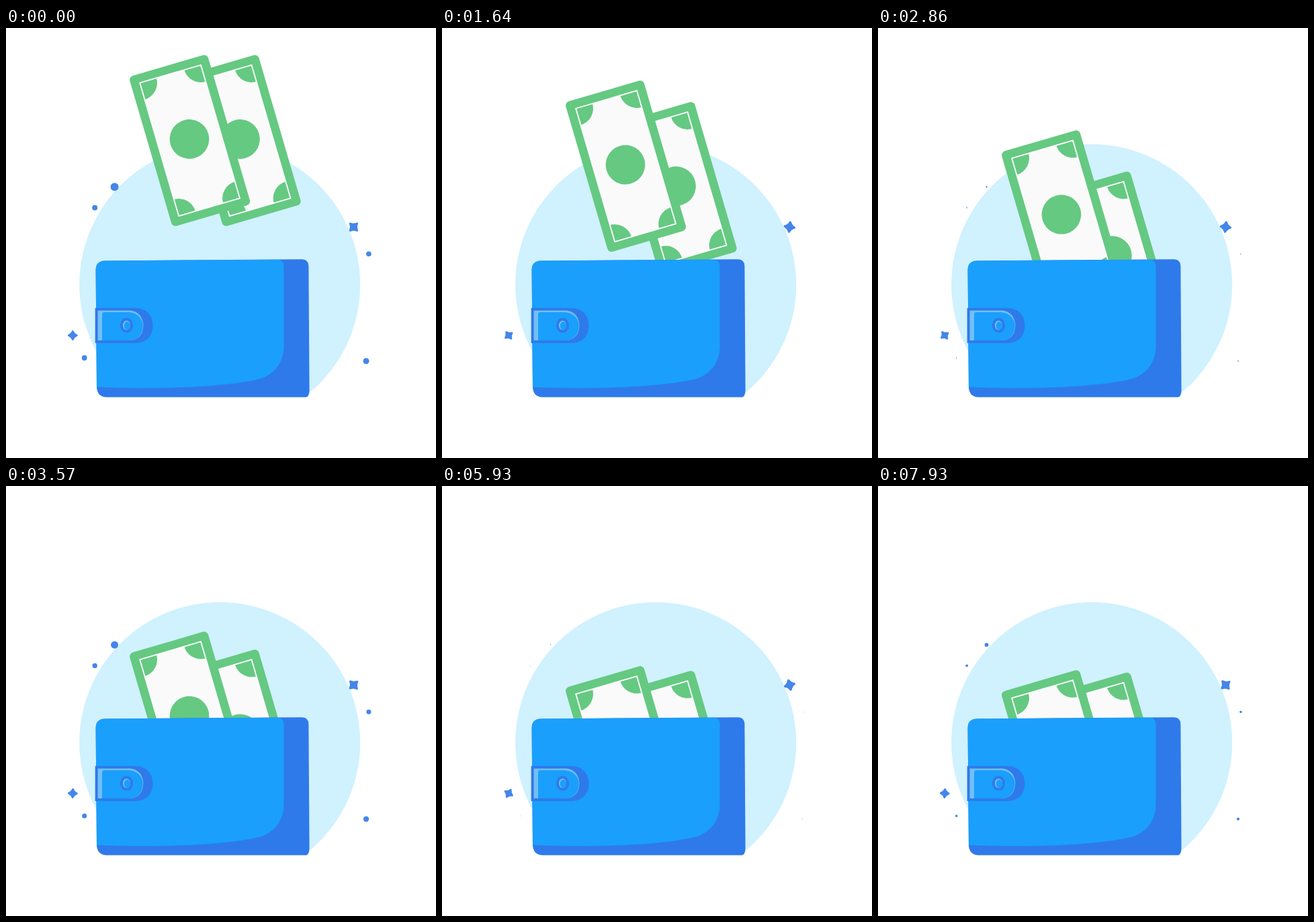
Write an HTML page that moves like this. It is 640 px wide and 640 px high and loops after 8 s.

```html
<!DOCTYPE html>
<html lang="en">
<head>
<meta charset="utf-8">
<title>Wallet</title>
<style>
  html, body { margin: 0; width: 100%; height: 100%; overflow: hidden; background: #fff; }
  svg { display: block; width: 100%; height: 100%; }
</style>
</head>
<body>
<svg viewBox="0 0 640 640">
  <defs>
    <clipPath id="ground"><rect width="640" height="546"/></clipPath>
    <clipPath id="inner"><rect x="-47.3" y="-103.3" width="94.6" height="206.6"/></clipPath>
    <g id="bill" transform="rotate(-16.3)">
      <rect x="-60.8" y="-116.5" width="121.6" height="233" rx="6.5" fill="#65c982"/>
      <rect x="-47.3" y="-103.3" width="94.6" height="206.6" fill="#fafafa"/>
      <g fill="#65c982" clip-path="url(#inner)">
        <circle cx="-47.3" cy="-103.3" r="25.8"/>
        <circle cx="47.3" cy="-103.3" r="25.8"/>
        <circle cx="-47.3" cy="103.3" r="25.8"/>
        <circle cx="47.3" cy="103.3" r="25.8"/>
      </g>
      <circle cx="0" cy="-2.2" r="29.3" fill="#65c982"/>
      <rect x="-47.3" y="-103.3" width="94.6" height="206.6" fill="none" stroke="#fff" stroke-width="1.8"/>
    </g>
    <path id="star" d="M0-7.1Q2-2 7.1 0Q2 2 0 7.1Q-2 2-7.1 0Q-2-2 0-7.1Z"
      fill="#4486ea" stroke="#4486ea" stroke-width="3.3" stroke-linejoin="round"/>
  </defs>

  <circle cx="318.2" cy="382" r="209" fill="#d0f1fe" clip-path="url(#ground)"/>
  <g fill="#4486ea">
    <circle class="dot" cx="161.6" cy="236.4" r="6"/>
    <circle class="dot" cx="132.2" cy="267.4" r="4"/>
    <circle class="dot" cx="539.9" cy="336.3" r="3.8"/>
    <circle class="dot" cx="536" cy="495.7" r="4.5"/>
    <circle class="dot" cx="116.7" cy="491" r="3.9"/>
  </g>
  <use id="bigStar" href="#star"/>
  <use id="smallStar" href="#star"/>
  <use id="back" href="#bill"/>
  <use id="front" href="#bill"/>

  <g id="wallet">
    <path fill="#2f7aea" d="M133.6 360Q133.6 347 147 346.4L440 344.2Q450 344.2 450.4 354L451.6 540Q451 549.6 446 549.6H150Q136 549 135 535Z"/>
    <path fill="#1a9ffc" d="M133.6 360Q133.6 347 147 346.4L405 344.7Q413.3 345.5 413.5 355V474C413.5 501 395 519.5 372 523.5C320 535 220 538 135 534.5Z"/>
    <path fill="#2f7aea" d="M132.7 416.7H192C209 416.7 218.5 428 218.5 443S209 469 192 469H132.7Z"/>
    <path fill="#73bff6" d="M136.6 420.5H183C197 420.5 204.3 431 204.3 443S197 465 183 465H136.6Z"/>
    <path fill="#1a9ffc" d="M143 426Q143 423 146 423H181C195 423 203.6 432 203.6 443.5S196 465 183 465H143Z"/>
    <ellipse cx="179.5" cy="442.5" rx="9.6" ry="11" fill="#2f7aea"/>
    <ellipse cx="179.5" cy="442.5" rx="5.6" ry="7" fill="#73bff6"/>
    <ellipse cx="180.5" cy="443.2" rx="4.6" ry="6.2" fill="#1a9ffc"/>
  </g>
</svg>
<script>
const LOOP = 8, FPS = 14, PULSE = 4.8;
const $ = id => document.getElementById(id);
const clamp = v => Math.min(1, Math.max(0, v));

// Easing along a cubic Bezier from (0,0) to (1,1), solved by bisection
function bezier(x1, y1, x2, y2) {
  const at = (a, b, s) => 3 * a * s * (1 - s) ** 2 + 3 * b * s * s * (1 - s) + s ** 3;
  return x => {
    let lo = 0, hi = 1;
    for (let i = 0; i < 24; i++) {
      const mid = (lo + hi) / 2;
      if (at(x1, x2, mid) < x) lo = mid; else hi = mid;
    }
    return at(y1, y2, lo);
  };
}

const easeFront = bezier(0.615, 0.33, 0.11, 1);
const easeBack = bezier(0.47, 0.35, 0.13, 1);
const frontDrop = t => 234 * easeFront(t / LOOP);
const backDrop = t => 237.5 * easeBack(clamp(t / 7.2));
const pulse = t => clamp(0.5 + 0.8 * Math.cos(2 * Math.PI * (t + 0.45) / PULSE));
const spin = t => -67.5 * t - 27 * Math.sin(Math.PI * t / LOOP);

const dots = [...document.querySelectorAll(".dot")].map(el => ({ el, r: +el.getAttribute("r") }));
const place = (id, transform) => $(id).setAttribute("transform", transform);

function draw(ms) {
  const t = Math.floor((ms + 5) * FPS / 1000) % (LOOP * FPS) / FPS;
  place("front", `translate(273.6 ${167.5 + frontDrop(t)})`);
  place("back", `translate(349.1 ${167.5 + backDrop(t)})`);
  place("bigStar", `translate(517.4 296.2) rotate(${45 + spin(t)})`);
  place("smallStar", `translate(99.3 457.5) rotate(${spin(t)}) scale(.85)`);
  for (const { el, r } of dots) el.setAttribute("r", r * pulse(t));
}

const start = performance.now();
function tick() {
  draw(performance.now() - start);
  requestAnimationFrame(tick);
}
tick();
</script>
</body>
</html>
```
